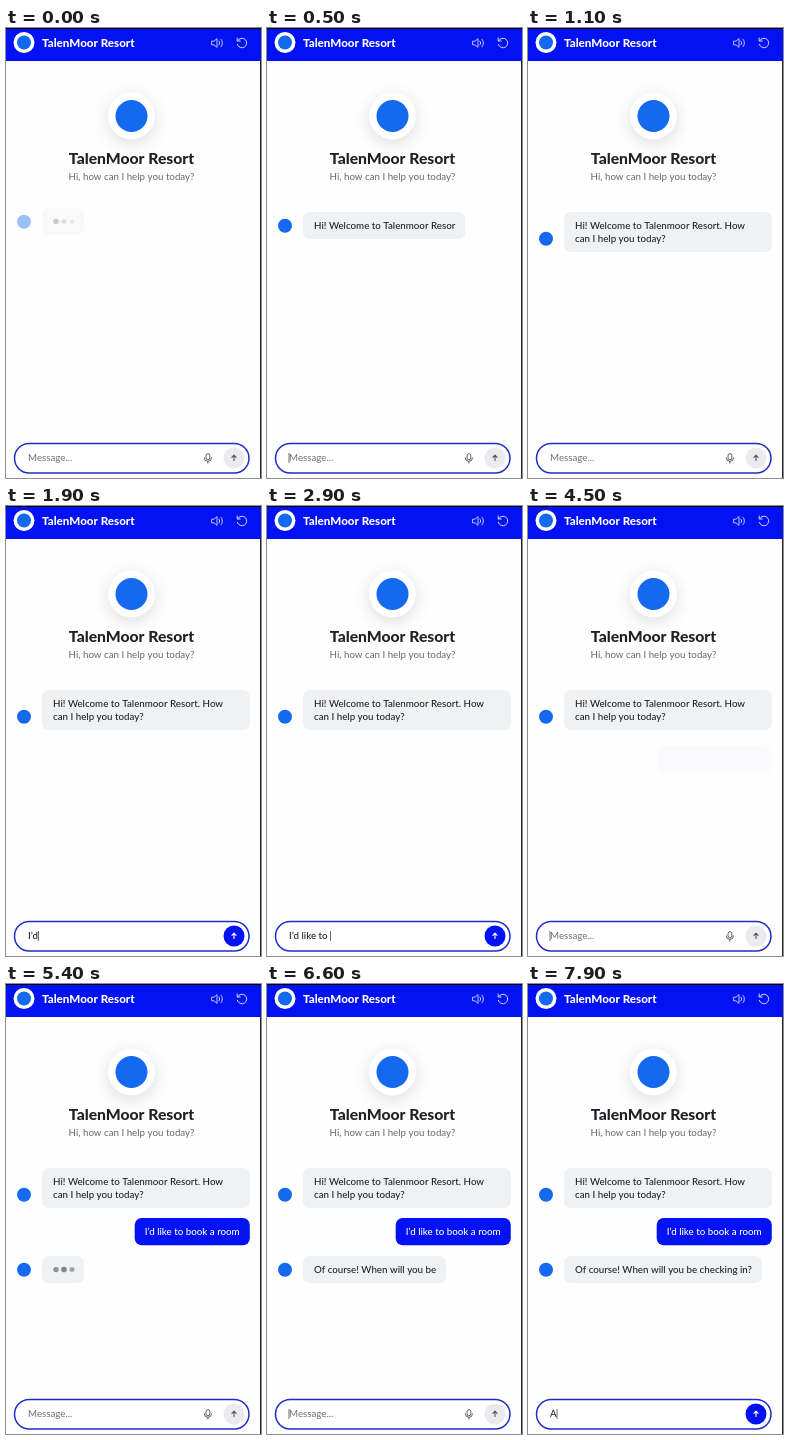
Recreate the animation shown at these times as an HTML page with a canvas. Size 255 by 450 pixels, loop 8000 ms.

```html
<!DOCTYPE html>
<html lang="en">
<head>
<meta charset="utf-8">
<title>Resort chat</title>
<style>
html, body { margin: 0; width: 100%; height: 100%; overflow: hidden; background: #fff; }
canvas { display: block; width: 255px; height: 450px; }
</style>
</head>
<body>
<canvas id="stage"></canvas>
<script>
const W = 255, H = 450, LOOP = 8000;
const BLUE = '#0212f5', AVATAR = '#1469ef', INK = '#202127', BUBBLE = '#f0f1f2';
const BODY = 9.75;
const BRAND = 'TalenMoor Resort';
const GREETING = ['Hi! Welcome to Talenmoor Resort. How ', 'can I help you today?'];
const REQUEST = 'I’d like to book a room';
const ANSWER = ['Of course! When will you be checking in?'];

const SEND = 4500, THINK = 5100;
const GREET_AT = 200, ANSWER_AT = 6330, STREAM_MS = 10;
const TYPE_AT = 1560, REPLY_AT = 7750, KEY_MS = 110;

const canvas = document.getElementById('stage');
const ctx = canvas.getContext('2d');
const dpr = window.devicePixelRatio || 1;
canvas.width = W * dpr;
canvas.height = H * dpr;

const clamp = (v, a = 0, b = 1) => Math.min(b, Math.max(a, v));
const ease = p => 1 - (1 - clamp(p)) ** 3;
const font = (size, weight = 400) => `${weight} ${size}px Lato, "Open Sans", sans-serif`;
const count = (t, start, step) => Math.max(0, Math.floor((t - start) / step));

function text(str, x, y, color = INK, size = BODY, weight = 500, align = 'left') {
  ctx.font = font(size, weight);
  ctx.textAlign = align;
  ctx.fillStyle = color;
  ctx.fillText(str, x, y);
}

function disc(x, y, r, color) {
  ctx.fillStyle = color;
  ctx.beginPath();
  ctx.arc(x, y, r, 0, 7);
  ctx.fill();
}

function box(x, y, w, h, r, color) {
  ctx.fillStyle = color;
  ctx.beginPath();
  ctx.roundRect(x, y, w, h, r);
  ctx.fill();
}

function stroke(path, color, width) {
  ctx.strokeStyle = color;
  ctx.lineWidth = width;
  ctx.lineCap = ctx.lineJoin = 'round';
  ctx.stroke(new Path2D(path));
}

function faded(alpha, dy, draw) {
  ctx.save();
  ctx.globalAlpha = alpha;
  ctx.translate(0, dy);
  draw();
  ctx.restore();
}

function header() {
  ctx.fillStyle = BLUE;
  ctx.fillRect(0, 0, W, 33);
  ctx.fillStyle = '#000';
  ctx.fillRect(0, 0, W, 1);
  disc(18, 14.5, 10.5, '#fff');
  disc(18, 14.5, 7, AVATAR);
  text(BRAND, 36, 18.7, '#fff', 11.6, 800);
  stroke('M206 13.2h2l3-2.6v8.8l-3-2.6h-2z M213 13a3 3 0 0 1 0 4 M215 11.2a5.5 5.5 0 0 1 0 7.6', '#d5d8ff', 0.9);
  stroke('M231.6 12.8a4.8 4.8 0 1 1-.3 3.6 M231.2 10v3h3', '#d5d8ff', 1);
}

function intro() {
  ctx.save();
  ctx.shadowColor = 'rgba(30,40,60,.15)';
  ctx.shadowBlur = 16 * dpr;
  ctx.shadowOffsetY = 4 * dpr;
  disc(125.5, 88, 23.5, '#fff');
  ctx.restore();
  disc(125.5, 88, 16, AVATAR);
  text(BRAND, 125.5, 135.6, INK, 15.7, 800, 'center');
  text('Hi, how can I help you today?', 125.5, 151.6, '#67686e', BODY, 400, 'center');
}

function avatar(y) {
  disc(18, y, 7, AVATAR);
}

function dots(top, age) {
  box(36, top, 42, 27, 7, BUBBLE);
  for (let i = 0; i < 3; i++) {
    const wave = (1 + Math.cos((age - 150 - i * 200) / 1000 * 2 * Math.PI)) / 2;
    disc(50 + i * 8, top + 13.6, 2.2 + 0.6 * wave, `rgba(75,76,82,${0.25 + 0.42 * wave})`);
  }
  avatar(top + 13.8);
}

function botText(lines, top, n) {
  const shown = [];
  for (const line of lines) {
    if (n > 0) shown.push(line.slice(0, n));
    n -= line.length;
  }
  ctx.font = font(BODY, 500);
  const w = shown.length > 1 ? 208 : ctx.measureText(shown[0].trimEnd()).width + 21;
  const h = 27 + 13 * (shown.length - 1);
  box(36, top, w, h, 7, BUBBLE);
  shown.forEach((s, i) => text(s, 47, top + 16.6 + i * 13));
  avatar(top + h - 13.2);
}

function botMessage(t, lines, top, born, streamAt, slide) {
  if (t < born) return;
  const p = ease((t - born) / 300);
  const n = count(t, streamAt, STREAM_MS);
  faded(p, slide * (1 - p), () => n > 0 ? botText(lines, top, n) : dots(top, t - born));
}

function userMessage(t) {
  if (t < SEND) return;
  const p = ease((t - SEND) / 250);
  faded(p, 6 * (1 - p), () => {
    box(128.7, 234, 115.1, 27.3, 7, BLUE);
    text(REQUEST, 186.2, 251.2, '#fff', BODY, 500, 'center');
  });
}

function caret(x) {
  ctx.fillStyle = '#4a4b52';
  ctx.fillRect(x, 425, 0.8, 10);
}

function composer(t) {
  const typed = t < SEND ? REQUEST.slice(0, count(t, TYPE_AT, KEY_MS))
                         : 'A'.slice(0, count(t, REPLY_AT, KEY_MS));
  box(8.5, 415.5, 234.5, 29.5, 14.7, '#fff');
  ctx.strokeStyle = '#1c2cc8';
  ctx.lineWidth = 1.5;
  ctx.stroke();
  disc(228, 430, 10.5, typed ? BLUE : '#ebebee');
  stroke('M228 432.5v-5 M225.9 429.3l2.1-2.1l2.1 2.1', typed ? '#fff' : '#55565c', 1.1);
  if (typed) {
    text(typed, 22, 433.2);
    caret(22 + ctx.measureText(typed).width);
    return;
  }
  text('Message...', 22, 433.2, '#707177', BODY, 400);
  if (t % 1000 >= 500) caret(21.6);
  stroke('M200 427.5a1.9 1.9 0 0 1 3.8 0v2.4a1.9 1.9 0 0 1-3.8 0z M198.3 429.8a3.6 3.6 0 0 0 7.2 0 M201.9 433.5v1.7', '#5c5d63', 1);
}

function draw(t) {
  ctx.setTransform(dpr, 0, 0, dpr, 0, 0);
  ctx.fillStyle = '#fefefe';
  ctx.fillRect(0, 0, W, H);
  ctx.fillStyle = '#26262c';
  ctx.fillRect(254, 33, 1, H - 33);
  header();
  intro();
  botMessage(t, GREETING, 184, -50, GREET_AT, -7);
  userMessage(t);
  botMessage(t, ANSWER, 272, THINK, ANSWER_AT, -5);
  composer(t);
}

const began = performance.now();
function tick() {
  draw((performance.now() - began) % LOOP);
  requestAnimationFrame(tick);
}
tick();
</script>
</body>
</html>
```
